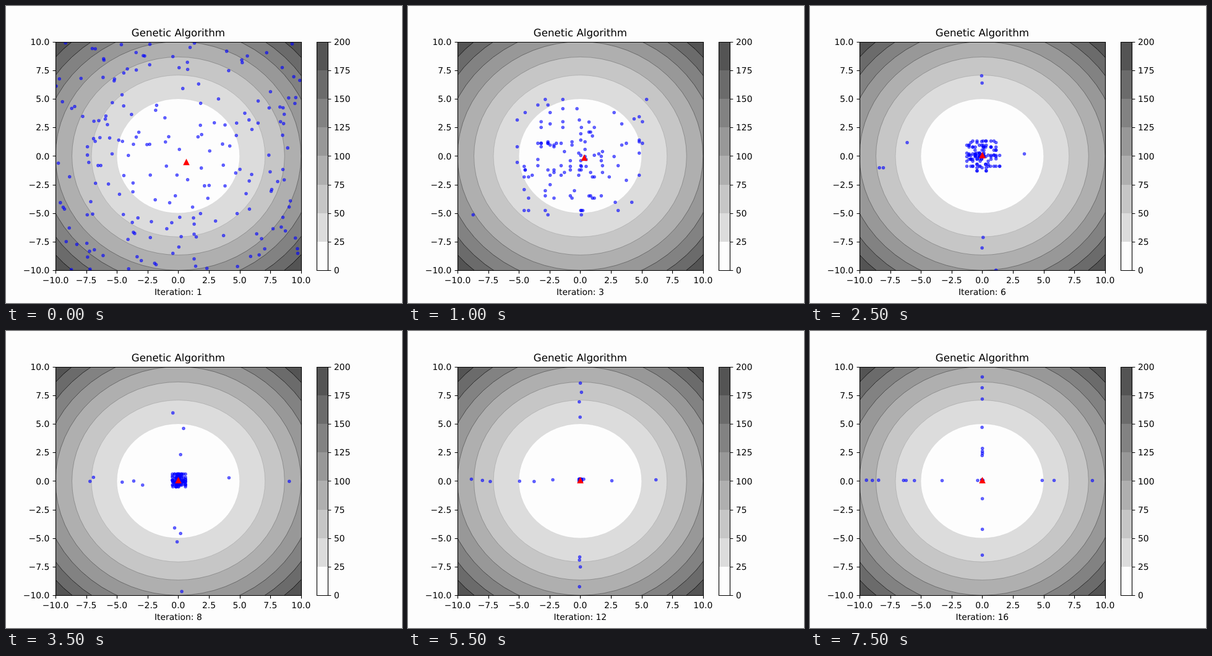
Write an HTML page that moves like this. It is 640x480 px and loops after 8 s.

```html
<!DOCTYPE html>
<html lang="en">
<head>
<meta charset="utf-8">
<title>Genetic Algorithm</title>
<style>
html, body { margin: 0; width: 100%; height: 100%; overflow: hidden; background: #fdfdfd; }
svg { display: block; }
text { font: 13.89px "DejaVu Sans", sans-serif; text-rendering: geometricPrecision; }
.title { font-size: 16.67px; }
.mid { text-anchor: middle; }
.end { text-anchor: end; }
.line { fill: none; stroke: #000; stroke-width: 1.11; }
#dots { fill: #00f; stroke: #00f; stroke-width: 1.39; fill-opacity: .55; stroke-opacity: .55; }
</style>
</head>
<body>
<svg width="640" height="480" viewBox="0 0 640 480">
  <clipPath id="plot"><rect x="80" y="58" width="397" height="369"/></clipPath>
  <g clip-path="url(#plot)">
    <g id="bands"></g>
    <g id="dots"></g>
    <path id="best" d="M0-4.17L4.17 4.17H-4.17Z" fill="red" stroke="red" stroke-width="1.39"/>
  </g>
  <g id="axes"></g>
  <text class="mid title" x="278.4" y="49">Genetic Algorithm</text>
  <text class="mid" id="label" x="278.4" y="467"></text>
</svg>
<script>
const $ = id => document.getElementById(id);
const STEP = 500, COUNT = 16, BANDS = 8;
const px = x => 278.4 + 19.84 * x;
const py = y => 242.4 - 18.48 * y;
const snap = v => Math.floor(v + .5) + .5;
const many = (n, f) => Array.from({ length: n }, (_, i) => f(i));

function shade(i) {
  const v = i ? Math.round(243 - 22.65 * i) : 253;
  return `rgb(${v},${v},${v})`;
}

function drawChart() {
  let bands = '', axes = '';
  for (let i = BANDS; i > 0; i--) {
    const r = Math.sqrt(25 * i);
    bands += `<ellipse cx="278.4" cy="242.4" rx="${19.84 * r}" ry="${18.48 * r}" fill="${shade(i - 1)}"
      stroke="#000" stroke-width=".8" stroke-opacity="${(i / 7) ** 1.5}"/>`;
  }
  // The colour bar, painted from the top down to each level
  for (let i = BANDS - 1; i >= 0; i--) {
    const y = Math.round(427.2 - 46.2 * (i + 1));
    axes += `<rect x="502" y="${y}" width="18" height="${427 - y}" fill="${shade(i)}"/>`;
  }
  for (let i = 0; i <= BANDS; i++) {
    const v = i * 2.5 - 10, x = px(v), y = py(v), base = Math.round(y + 5.2);
    const name = v.toFixed(1).replace('-', '\u2212');
    axes += `<path class="line" d="M${snap(x)} 427.5v4.9M80.5 ${snap(y)}h-4.9M520.5 ${snap(y)}h4.9"/>
      <text class="mid" x="${x}" y="448">${name}</text>
      <text class="end" x="70.3" y="${base}">${name}</text>
      <text x="530" y="${base}">${25 * i}</text>`;
  }
  axes += '<path class="line" d="M80.5 58.5H477.5V427.5H80.5ZM502.5 58.5H520.5V427.5H502.5Z"/>';
  $('bands').innerHTML = bands;
  $('axes').innerHTML = axes;
}

function seeded(s) {
  return () => {
    s = s + 0x6D2B79F5 | 0;
    let t = Math.imul(s ^ s >>> 15, 1 | s);
    t = t + Math.imul(t ^ t >>> 7, 61 | t) ^ t;
    return ((t ^ t >>> 14) >>> 0) / 4294967296;
  };
}

function population(k) {
  const rnd = seeded(k * 977);
  const anywhere = () => rnd() * 20 - 10;
  if (k === 1) return many(200, () => [anywhere(), anywhere()]);

  // Children recombine coordinates from a gene pool that shrinks towards the optimum
  const decay = .65 ** (k - 2), spread = 8 * decay;
  const size = Math.round(8 + 60 * decay);
  const pool = () => many(size, i => {
    const g = 2 * (i + rnd()) / size - 1;
    return spread * g * Math.sqrt(Math.abs(g));
  });
  const xs = pool(), ys = pool();
  const pick = genes => genes[Math.floor(rnd() * size)];
  const children = many(115, () => [pick(xs), pick(ys) + .05]);

  // A mutant keeps one inherited coordinate and draws the other anew
  const mutants = many(6 + k, i => i % 2 ? [anywhere(), pick(ys) + .05] : [pick(xs), anywhere()]);
  return children.concat(mutants);
}

// The best individual closes in on the optimum over the first iterations
function leader(k) {
  const x = Math.max(0, 13 - 3.3 * (k - 1)), y = Math.max(0, 11 - 3.5 * (k - 1));
  return [278.5 + x, 241.5 + y];
}

let shown = 0;
function frame() {
  const k = Math.floor(performance.now() / STEP) % COUNT + 1;
  if (k !== shown) {
    shown = k;
    $('dots').innerHTML = population(k)
      .map(([x, y]) => `<circle cx="${px(x)}" cy="${py(y)}" r="2.08"/>`).join('');
    $('best').setAttribute('transform', `translate(${leader(k)})`);
    $('label').textContent = 'Iteration: ' + k;
  }
  requestAnimationFrame(frame);
}

drawChart();
frame();
</script>
</body>
</html>
```
